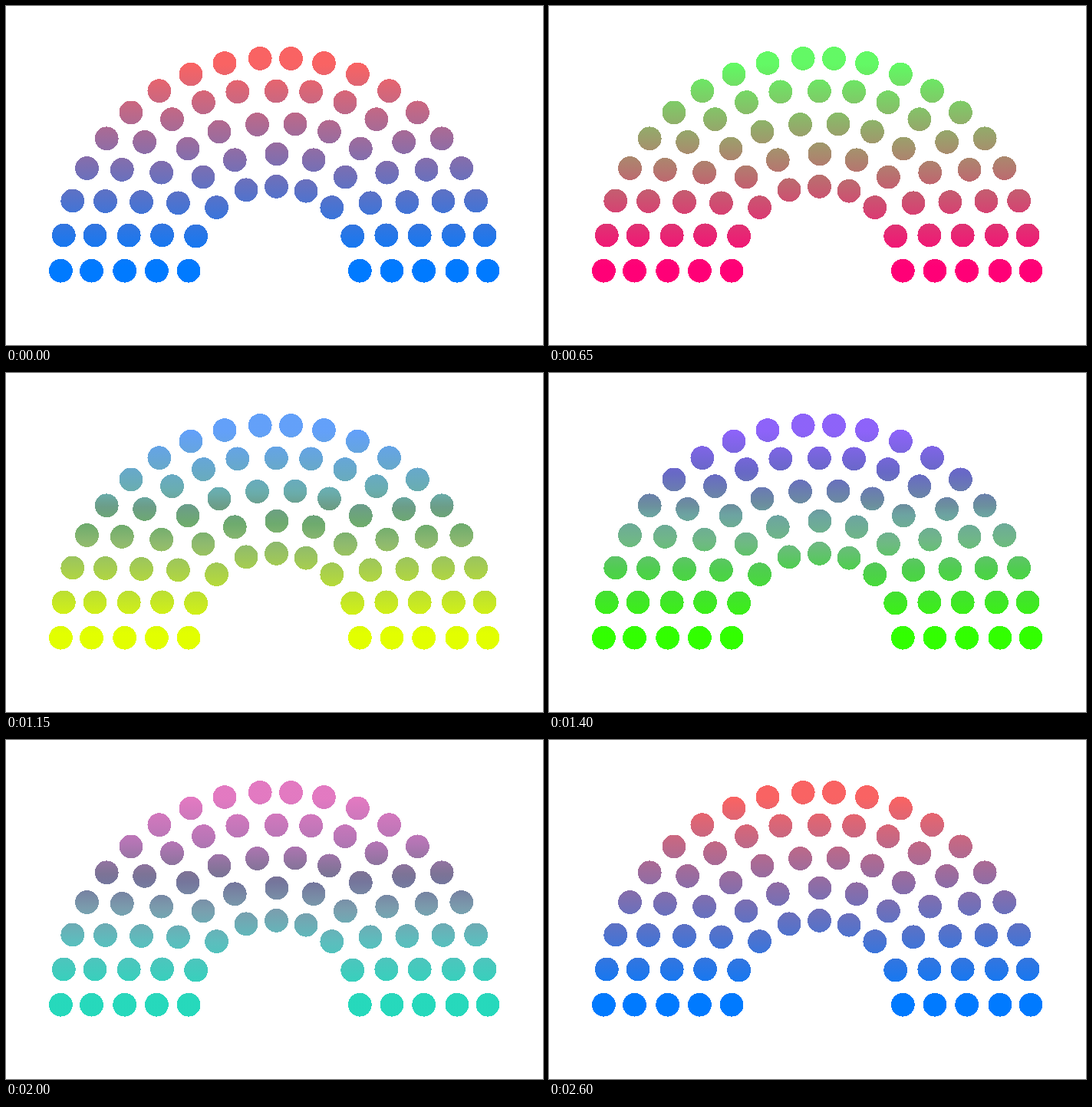
Animation of 700 by 442 pixels, one loop 2.65 s. Source, as an HTML page:

```html
<!DOCTYPE html>
<html lang="en">
<head>
<meta charset="utf-8">
<title>Hemicycle</title>
<style>
  html, body { margin: 0; width: 100%; height: 100%; overflow: hidden; background: #fff; }
  svg { display: block; width: 700px; height: 442px; }
</style>
</head>
<body>
<svg viewBox="0 0 700 442">
  <defs>
    <linearGradient id="tint" gradientUnits="userSpaceOnUse" x1="0" y1="76" x2="0" y2="339"></linearGradient>
  </defs>
  <g id="seats" fill="url(#tint)" shape-rendering="crispEdges"></g>
</svg>
<script>
const NS = 'http://www.w3.org/2000/svg';
const LOOP = 2650, STEP = 50, STOPS = 48;
const CX = 349.7, CY = 345.2, SEAT = 15.4;
const TOP = [249, 99, 99], BOTTOM = [0, 122, 255];

// Each ring climbs from both ends in equal angles: radius, degrees per seat, seats per side.
const RINGS = [[278.3, 9.57, 9], [238.2, 11.2, 8], [195, 13.68, 6], [153.3, 17.6, 5], [111.6, 23.85, 3]];
// Seats that close the rings at the top.
const CROWN = [
  [331.2, 68.4], [371.5, 68.4], [352.4, 111], [327.5, 154.4], [377.1, 154],
  [352.9, 193], [352.5, 235.3], [313.1, 239.8], [391.1, 241.2]
];

// time, value
const HUE = [[0, 0], [350, 57], [900, 174], [1400, 257], [1750, 315], [2250, 323], [2600, 360]];
const SAT = [[1750, 1], [2250, 0.4], [2600, 1]];

function add(parent, name, attrs) {
  const el = document.createElementNS(NS, name);
  for (const key in attrs) el.setAttribute(key, attrs[key]);
  return parent.appendChild(el);
}

function track(keys, t) {
  if (t <= keys[0][0]) return keys[0][1];
  for (let i = 1; i < keys.length; i++) {
    const [t0, a] = keys[i - 1], [t1, b] = keys[i];
    if (t <= t1) return a + (b - a) * (t - t0) / (t1 - t0);
  }
  return keys[keys.length - 1][1];
}

function toHsl([r, g, b]) {
  const max = Math.max(r, g, b), min = Math.min(r, g, b), d = max - min;
  const sum = (max + min) / 255;
  const h = max === r ? (g - b) / d : max === g ? (b - r) / d + 2 : (r - g) / d + 4;
  return [h * 60, d / 255 / (1 - Math.abs(sum - 1)), sum / 2];
}

const seats = document.getElementById('seats');
const seat = (cx, cy) => add(seats, 'circle', { cx, cy, r: SEAT });
for (const [radius, step, count] of RINGS) {
  for (let i = 0; i < count; i++) {
    const a = i * step * Math.PI / 180;
    const dx = radius * Math.cos(a), y = CY - radius * Math.sin(a);
    seat(CX - dx, y);
    seat(CX + dx, y);
  }
}
for (const [x, y] of CROWN) seat(x, y);

const tint = document.getElementById('tint');
const stops = Array.from({ length: STOPS + 1 }, (_, i) => {
  const k = i / STOPS;
  return {
    el: add(tint, 'stop', { offset: k }),
    hsl: toHsl(TOP.map((c, j) => c + (BOTTOM[j] - c) * k))
  };
});

function draw(t) {
  const turn = track(HUE, t), sat = track(SAT, t);
  for (const { el, hsl: [h, s, l] } of stops) {
    const hue = (h + turn + 720) % 360;
    el.setAttribute('stop-color',
      `hsl(${hue.toFixed(2)}, ${(s * sat * 100).toFixed(2)}%, ${(l * 100).toFixed(2)}%)`);
  }
}

const start = performance.now();
function tick() {
  const t = (performance.now() - start) % LOOP;
  draw(Math.floor(t / STEP) * STEP);
  requestAnimationFrame(tick);
}
tick();
</script>
</body>
</html>
```
